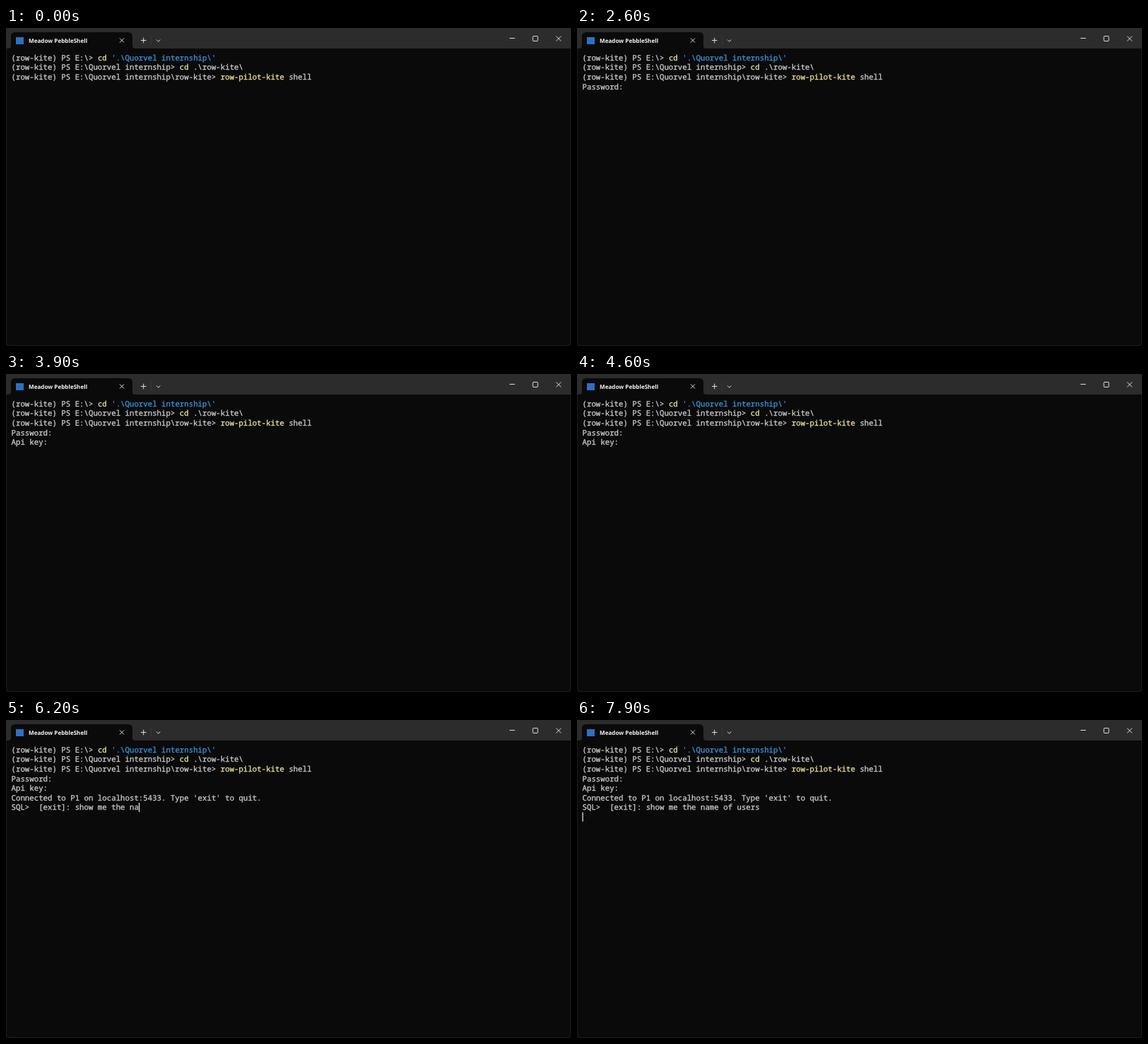
An HTML page that plays this animation: 800 by 450 pixels, repeating every 8 s.

```html
<!DOCTYPE html>
<html lang="en">
<head>
<meta charset="utf-8">
<title>Terminal session</title>
<style>
  html, body { margin: 0; width: 100%; height: 100%; overflow: hidden; background: #0a0a0a; }
  svg { display: block; width: 100%; height: 100%; }
  text { white-space: pre; text-rendering: geometricPrecision; fill: currentColor; }
  .term {
    font: 500 10.742px "Noto Sans Mono", "DejaVu Sans Mono", monospace;
    color: #ccc; stroke: currentColor; stroke-width: .3;
  }
  .title { font: 700 8.1px "Open Sans", "Noto Sans", sans-serif; color: #f4f4f4; }
  .term tspan { fill: currentColor; stroke: currentColor; }
  .cmd { color: #e9e79a; }
  .str { color: #3a93d8; }
  .icons { fill: none; stroke: #dedede; stroke-width: 1; }
</style>
</head>
<body>
<svg viewBox="0 0 800 450">
  <rect width="800" height="450" fill="#0a0a0a"/>
  <rect width="800" height="29" fill="#2c2c2c"/>
  <path d="M3 29Q7 29 7 25V12Q7 6 13 6H173Q179 6 179 12V25Q179 29 183 29Z" fill="#0a0a0a"/>
  <path d="M.5 29V444Q.5 449.5 6 449.5H794Q799.5 449.5 799.5 444V29" fill="none" stroke="#1c1c1c"/>
  <rect x="14" y="13" width="11" height="10" fill="#2f6fc0"/>
  <text class="title" x="32" y="21.3">Meadow PebbleShell</text>
  <path d="M205.5 11V24" stroke="#383838"/>
  <g class="icons">
    <path d="M161 14.5l6 6m0-6l-6 6"/>
    <path d="M191 17.5h7.5m-3.8-3.8v7.6"/>
    <path d="M213 16.5l2.7 2.7l2.7-2.7"/>
    <path d="M713 14.5h7.5"/>
    <rect x="746" y="11.5" width="7" height="7" rx="1"/>
    <path d="M779 11.5l7 7m0-7l-7 7"/>
  </g>
  <g class="term">
    <text>(row-kite) PS E:\&gt; <tspan class="cmd">cd</tspan> <tspan class="str">'.\Quorvel internship\'</tspan></text>
    <text>(row-kite) PS E:\Quorvel internship&gt; <tspan class="cmd">cd</tspan> .\row-kite\</text>
    <text>(row-kite) PS E:\Quorvel internship\row-kite&gt; <tspan class="cmd">row-pilot-kite</tspan> shell</text>
    <text data-at="1400">Password:</text>
    <text data-at="3200">Api key:</text>
    <text data-at="5200">Connected to P1 on localhost:5433. Type 'exit' to quit.</text>
    <text data-at="5200">SQL&gt;  [exit]: <tspan id="typed"></tspan></text>
  </g>
  <rect id="cursor" width="1.2" height="13" fill="#f2f2f2"/>
</svg>
<script>
  const LOOP = 8000, STEP = 100;
  const LEFT = 7.5, CHAR = 6.445, TOP = 35.4, LINE = 13.62;
  const QUERY = 'show me the name of users', PROMPT_COLS = 14;
  const TYPE_START = 5600, TYPE_END = 6700, ENTER = 7700;

  const lines = [...document.querySelectorAll('.term text')];
  const typed = document.getElementById('typed');
  const cursor = document.getElementById('cursor');

  lines.forEach((line, row) => {
    line.setAttribute('x', LEFT);
    line.setAttribute('y', TOP + 10.3 + row * LINE);
  });

  const show = (el, on) => el.setAttribute('visibility', on ? 'visible' : 'hidden');

  // Cursor cell as [column, row], or null while hidden
  function cursorCell(t, count) {
    if (t >= 300 && t < 1000) return [0, 3];
    if (t >= ENTER) return [0, 7];
    if (t > TYPE_START && t < 7200) return [PROMPT_COLS + count, 6];
    return null;
  }

  function draw(now) {
    const t = Math.floor(now % LOOP / STEP) * STEP;
    const part = (t - TYPE_START) / (TYPE_END - TYPE_START);
    const count = Math.round(QUERY.length * Math.min(1, Math.max(0, part)));
    lines.forEach(line => show(line, t >= (line.dataset.at || 0)));
    typed.textContent = QUERY.slice(0, count);

    const cell = cursorCell(t, count);
    show(cursor, cell);
    if (cell) {
      cursor.setAttribute('x', LEFT + cell[0] * CHAR);
      cursor.setAttribute('y', TOP + cell[1] * LINE);
    }
  }

  function frame() {
    draw(performance.now());
    requestAnimationFrame(frame);
  }
  frame();
</script>
</body>
</html>
```
